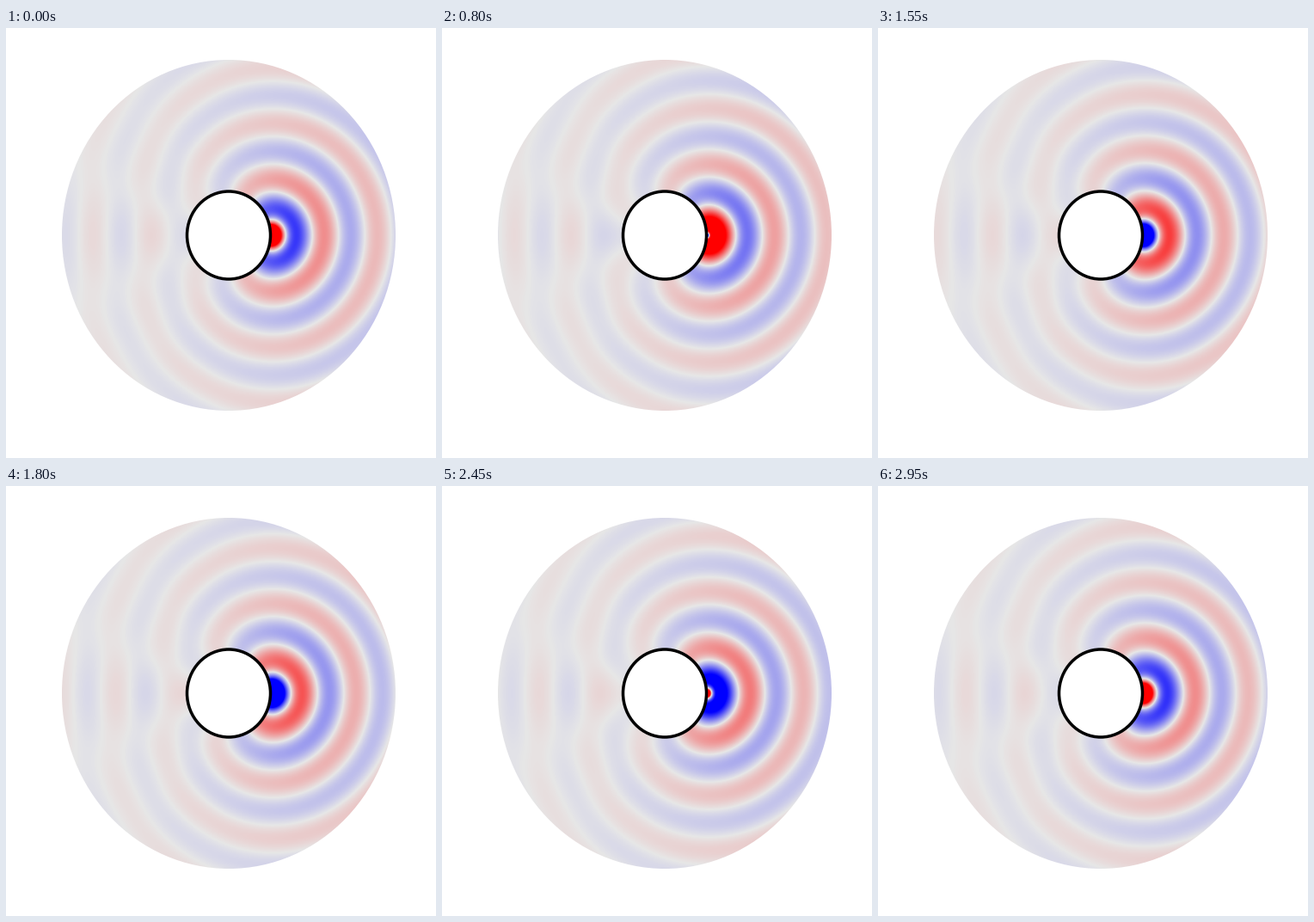
Animation of 500 by 500 pixels, one loop 3 s. Source, as a matplotlib script:

```python
import numpy as np
import matplotlib.pyplot as plt
from matplotlib.animation import FuncAnimation
from matplotlib.colors import LinearSegmentedColormap
from matplotlib.patches import Ellipse

SIZE, FRAMES, INTERVAL = 500, 60, 50
CX, CY = 259, 241          # centre of the sphere
SX, SY = 48.5, 51          # pixels per sphere radius
R_OUT = 4
K = 5                      # wavenumber times sphere radius
ORDERS = 60
GAIN, PHASE = 0.27, 0.18


def hankel(x):
    """Yield spherical Hankel functions of order 0, 1, 2, ..."""
    a = -1j * np.exp(1j * x) / x
    b = a * (1 / x - 1j)
    n = 1
    while True:
        yield a
        a, b = b, (2 * n + 1) / x * b - a
        n += 1


def legendre(mu):
    """Yield Legendre polynomials of degree 0, 1, 2, ..."""
    a, b = np.ones_like(mu), mu
    n = 1
    while True:
        yield a
        a, b = b, ((2 * n + 1) * mu * b - n * a) / (n + 1)
        n += 1


def sphere_field(r, mu):
    """Complex pressure of a point source on a rigid sphere of radius 1."""
    edge = hankel(K)
    h_edge = [next(edge) for _ in range(ORDERS + 1)]
    rho = np.sqrt(np.maximum(r * r - 2 * r * mu + 1, 1e-4))
    # the 1/rho pole is summed in closed form
    total = 2 / rho + 0j
    for n, h, p in zip(range(ORDERS), hankel(K * r), legendre(mu)):
        slope = n / K * h_edge[n] - h_edge[n + 1]
        total += (-(2 * n + 1) * h / (K * slope) - 2 * r ** (-n - 1.0)) * p
    return total


px = np.arange(SIZE) + 0.5
x, y = np.meshgrid((px - CX) / SX, (px - CY) / SY)
radius = np.hypot(x, y)
inside = (radius > 0.95) & (radius < R_OUT + 0.1)
field = np.zeros((SIZE, SIZE), complex)
field[inside] = GAIN * sphere_field(np.maximum(radius[inside], 1),
                                    x[inside] / radius[inside])

fig = plt.figure(figsize=(5, 5), dpi=100, facecolor="white")
ax = fig.add_axes([0, 0, 1, 1])
ax.set_axis_off()

cmap = LinearSegmentedColormap.from_list(
    "wave", ["#0000ff", (0.905, 0.905, 0.905), "#ff0000"], N=1024)
image = ax.imshow(field.real, cmap=cmap, vmin=-1, vmax=1, aspect="auto",
                  extent=(0, SIZE, SIZE, 0), interpolation="nearest")
ax.set(xlim=(0, SIZE), ylim=(SIZE, 0))


def ellipse(scale, **style):
    return Ellipse((CX, CY), 2 * SX * scale, 2 * SY * scale, **style)


disk = ellipse(R_OUT, transform=ax.transData)
image.set_clip_path(disk)
ax.add_patch(ellipse(1, facecolor="white", edgecolor="black",
                     linewidth=3.5 * 72 / 100, zorder=3))


def update(i):
    angle = 2 * np.pi * i / FRAMES + PHASE
    image.set_data((field * np.exp(-1j * angle)).real)
    return (image,)


anim = FuncAnimation(fig, update, frames=FRAMES, interval=INTERVAL,
                     repeat=True, repeat_delay=0)
plt.show()
```
